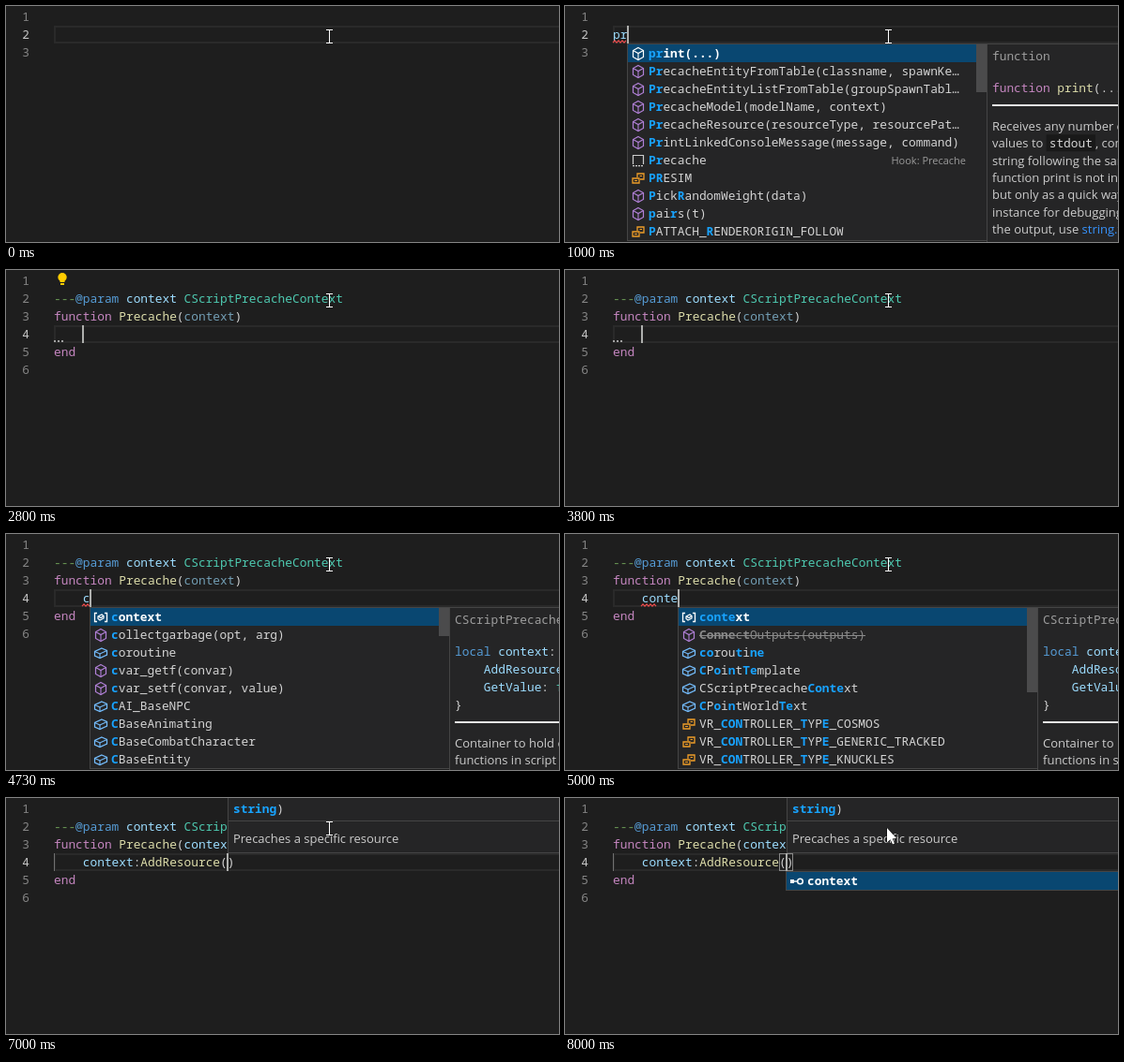
Animation, 589 px wide and 252 px high, one loop 8300 ms. Source, as an HTML page with a canvas:

```html
<!DOCTYPE html>
<html lang="en">
<head>
<meta charset="utf-8">
<title>Editor completion</title>
<style>
html, body { margin: 0; width: 100%; height: 100%; overflow: hidden; background: #1e1e1e; }
canvas { display: block; width: 589px; height: 252px; }
</style>
</head>
<body>
<canvas id="stage" width="589" height="252"></canvas>
<script>
const ctx = document.getElementById('stage').getContext('2d');
const LOOP = 8300, LEFT = 51, CHAR = 7.698, ROW = 19, MENU_W = 383;
const MONO = '12.83px "Noto Sans Mono", monospace';
const SANS = '13px "Open Sans", sans-serif';
const MATCH = '#18a3ff';

// Rich text: parts split by "|", each starting with its colour key.
const COLORS = {
  w: '#d4d4d4', g: '#9d9d9d', v: '#9cdcfe', u: '#729db3', k: '#c586c0', f: '#dcdcaa',
  b: '#569cd6', t: '#4ec9b0', c: '#6a9955', n: '#cccccc', l: '#3794ff', x: '#d4d4d4'
};

// Menu rows: icon kind, then the label with matched letters in brackets.
const FUNCS = [
  'm[#]ecacheEntityFromTable(classname, spawnKe…',
  'm[#]ecacheEntityListFromTable(groupSpawnTabl…',
  'm[#]ecacheModel(modelName, context)',
  'm[#]ecacheResource(resourceType, resourcePat…'
];
const funcs = typed => FUNCS.map(s => s.replace('[#]ecache', `[${typed}]${'Precache'.slice(typed.length)}`));
const CONTROLLERS = ['COSMOS', 'GENERIC_TRACKED', 'KNUCKLES'];
const controllers = head => CONTROLLERS.map(s => `e${head}_${s}`);

const MENUS = {
  p: { bar: 36, rows: ['m[p]rint(...)', 'm[p]airs(t)', 'm[p]call(f, arg1)', ...funcs('P'),
    'm[P]rintLinkedConsoleMessage(message, command)', 's[P]recache', 'm[P]ickRandomWeight(data)', 'e[P]RESIM'] },
  pr: { bar: 51, rows: ['m[pr]int(...)', ...funcs('Pr'), 'm[Pr]intLinkedConsoleMessage(message, command)',
    's[Pr]ecache', 'e[PR]ESIM', 'm[P]ick[R]andomWeight(data)', 'm[p]ai[r]s(t)', 'e[P]ATTACH_[R]ENDERORIGIN_FOLLOW'] },
  pre: { bar: 90, rows: [...funcs('Pre'), 's[Pre]cache', 'e[PRE]SIM', 'fCScript[Pre]cacheContext',
    'e[P]ATTACH_[RE]NDERORIGIN_FOLLOW', 'm[p]ai[r]s(t)', 'm[P]ick[R]andomW[e]ight(data)'] },
  prec: { pick: 4, rows: [...funcs('Prec'), 's[Prec]ache', 'fCScript[Prec]acheContext'] },
  c: { bar: 30, rows: ['v[c]ontext', 'm[c]ollectgarbage(opt, arg)', 'f[c]oroutine', 'm[c]var_getf(convar)',
    'm[c]var_setf(convar, value)', 'f[C]AI_BaseNPC', 'f[C]BaseAnimating', 'f[C]BaseCombatCharacter', 'f[C]BaseEntity'] },
  co: { bar: 44, rows: ['v[co]ntext', 'm[co]llectgarbage(opt, arg)', 'd[Co]nnectOutputs(outputs)', 'f[co]routine',
    'f[C]P[o]intTemplate', 'f[C]P[o]intWorldText', 'fCScriptPrecache[Co]ntext', ...controllers('VR_[CO]NTROLLER_TYPE').slice(0, 2)] },
  conte: { bar: 90, rows: ['v[conte]xt', 'd[Conne]c[t]Outputs(outputs)', 'f[co]rou[t]i[ne]', 'f[C]P[o]i[n]t[Te]mplate',
    'fCScriptPrecache[Conte]xt', 'f[C]P[o]i[n]tWorld[Te]xt', ...controllers('VR_[CON]TROLLER_[T]YP[E]')] },
  context: { rows: ['v[context]', 'fCScriptPrecache[Context]', 'f[C]P[o]i[n]tWorld[Text]'] },
  methods: { rows: ['mAddResource(resource)', 'mGetValue(key)'] },
  param: { rows: ['kcontext'] }
};

const DOCS = {
  print: { head: 'function', code: ['kfunction|f print|w(...)'], text: [
    'nReceives any number of arguments', 'nvalues to |xstdout|n, converting', 'nstring following the same rules',
    'nfunction print is not intended', 'nbut only as a quick way to', 'ninstance for debugging. For', 'nthe output, use |lstring.format'] },
  snippet: { head: 'Hook: Precache', code: ['c---|b@param|v context|t CScriptPrecacheContext',
    'kfunction|f Precache|w(|vcontext|w)', '', 'kend'], text: [] },
  context: { head: 'CScriptPrecacheContext', code: ['blocal|v context|w: |tCScriptPrecacheContext|w {',
    'v    AddResource|w: |tfunction', 'v    GetValue|w: |tfunction', 'w}'],
    text: ['nContainer to hold context', 'nfunctions in script'] },
  method: { head: 'function', code: ['tmethod CScriptPrecacheContext'], text: ['nPrecaches a specific resource'], h: 104 }
};

// time, typed text, menu, doc panel, squiggle columns
const STEPS = [
  [0, ''],
  [730, 'vp'],
  [800, 'vp', 'p', null, [0, 1]],
  [870, 'vp', 'p', 'print', [0, 1]],
  [930, 'vpr', 'p', 'print', [0, 1]],
  [1000, 'vpr', 'pr', 'print', [0, 2]],
  [1130, 'vpre', 'pr', 'print', [0, 2]],
  [1200, 'vpre', 'pre', 'print', [0, 3]],
  [1400, 'vprec', 'prec', 'snippet', [0, 4]],
  [2800, ''],
  [4670, 'vc'],
  [4730, 'vc', 'c', 'context', [4, 5]],
  [4800, 'vco', 'co', 'context', [4, 5]],
  [4870, 'vcon', 'co', 'context', [4, 6]],
  [4930, 'vcont', 'conte', 'context', [4, 6]],
  [5000, 'vconte', 'conte', 'context', [4, 6]],
  [5070, 'vcontex', 'context', 'context', [4, 9]],
  [5270, 'vcontext', 'context', 'context', [4, 11]],
  [5600, 'vcontext|w:', null, null, [4, 11]],
  [5670, 'vcontext|w:', 'methods', null, [11.5, 12.5]],
  [5730, 'vcontext|w:', 'methods', 'method', [11.5, 12.5]],
  [6470, 'vcontext|w:|fAddResource', null, null, [11.5, 12.5]],
  [6530, 'vcontext|w:|fAddResource', null, null, [22.5, 23.5]],
  [6930, 'vcontext|w:|fAddResource|w()'],
  [7130, 'vcontext|w:|fAddResource|w()', 'param']
];
const BLINKS = [470, 1870, 2330, 3270, 3800, 4270, 4670, 6070, 6470, 7530, 8000];

const colX = col => Math.floor(LEFT + col * CHAR);
const plain = rich => rich.split('|').map(s => s.slice(1)).join('');

function rect(x, y, w, h, color) {
  ctx.fillStyle = color;
  ctx.fillRect(x, y, w, h);
}

function box(x, y, w, h) {
  rect(x, y, w, h, '#454545');
  rect(x + 1, y + 1, w - 2, h - 2, '#252526');
}

function text(s, x, y, color, font = MONO) {
  ctx.font = font;
  ctx.fillStyle = color;
  ctx.fillText(s, x, y);
  return x + ctx.measureText(s).width;
}

function rich(s, x, y) {
  for (const part of s.split('|')) {
    const key = part[0], body = part.slice(1);
    if (key === 'x') {
      rect(x, y - 14, body.length * CHAR + 6, 18, '#191919');
      x = text(body, x + 3, y, COLORS.x) + 3;
    } else if (key) {
      x = text(body, x, y, COLORS[key], 'nl'.includes(key) ? SANS : MONO);
    }
  }
}

function path(points, color, width = 1.1, close = false) {
  ctx.beginPath();
  points.forEach(([x, y]) => ctx.lineTo(x, y));
  if (close) ctx.closePath();
  ctx.strokeStyle = color;
  ctx.lineWidth = width;
  ctx.stroke();
}

function icon(kind, x, y, selected) {
  const hue = { m: '#b180d7', d: '#b180d7', f: '#75beff', v: '#75beff', e: '#ee9d28', s: '#cccccc', k: '#cccccc' };
  const color = selected ? '#ffffff' : hue[kind];
  ctx.save();
  ctx.translate(x, y);
  if (kind === 'm' || kind === 'd') {
    path([[0, -6.5], [5.5, -3.5], [5.5, 3.5], [0, 6.5], [-5.5, 3.5], [-5.5, -3.5]], color, 1.2, true);
    path([[-5.5, -3.5], [0, -.5], [5.5, -3.5]], color);
    path([[0, -.5], [0, 6.5]], color);
  } else if (kind === 'f') {
    path([[1, -5], [6.5, -2.5], [6.5, 2], [-1, 5.5], [-6.5, 3], [-6.5, -1.5]], color, 1.2, true);
    path([[-6.5, -1.5], [-1, 1], [6.5, -2.5]], color);
    path([[-1, 1], [-1, 5.5]], color);
  } else if (kind === 'v') {
    for (const s of [-1, 1]) path([[s * 4, -4.5], [s * 6.5, -4.5], [s * 6.5, 4.5], [s * 4, 4.5]], color, 1.3);
    path([[-3, -1], [1, -3], [3, -1.5], [3, 1], [-1, 3], [-3, 1.5]], color, 1.2, true);
    path([[-3, -1], [0, .5], [3, -1.5]], color);
  } else if (kind === 'e') {
    path([[-1, -1], [-1, -5], [6, -5], [6, 1], [2, 1]], color, 1.3);
    path([[-6, 0], [1, 0], [1, 5], [-6, 5]], color, 1.3, true);
    path([[1.5, -2.5], [4, -2.5]], color);
    path([[-4, 2.5], [-1, 2.5]], color);
  } else if (kind === 's') {
    path([[-5.5, 4], [-5.5, -5.5], [5.5, -5.5], [5.5, 4]], color, 1.2);
    for (let i = -6; i < 6; i += 3) rect(i, 5, 2, 1.3, color);
  } else {
    ctx.beginPath();
    ctx.arc(3.5, 0, 2.8, 0, 7);
    ctx.strokeStyle = color;
    ctx.lineWidth = 1.5;
    ctx.stroke();
    path([[-5, 0], [1, 0]], color, 1.4);
    rect(-7, -2, 4, 4, color);
  }
  ctx.restore();
}

function drawMenu({ rows, bar, pick = 0 }, x, top) {
  box(x, top, MENU_W + 1, rows.length * ROW + 2);
  rows.forEach((row, i) => {
    const y = top + 1 + i * ROW, selected = i === pick, kind = row[0];
    if (selected) rect(x + 1, y, MENU_W - 1, ROW, '#094771');
    icon(kind, x + 12, y + 10, selected);
    let end = x + 23;
    row.slice(1).split(/[\[\]]/).forEach((part, j) => {
      const hit = j % 2;
      const color = kind === 'd' ? '#8a8a8a' : hit ? MATCH : selected ? '#ffffff' : '#d4d4d4';
      end = text(part, end, y + 14, color, (hit || selected ? 'bold ' : '') + MONO);
    });
    if (kind === 'd') rect(x + 23, y + 10, end - x - 23, 1, '#8a8a8a');
    if (kind === 's') {
      ctx.textAlign = 'right';
      text('Hook: Precache', x + 361, y + 14, '#9a9a9a', '11px "Open Sans", sans-serif');
      ctx.textAlign = 'left';
    }
  });
  if (bar) rect(x + MENU_W - 11, top + 1, 11, bar, '#4b4b4c');
}

function drawDoc({ head, code, text: lines, h = 260 }, x, top) {
  box(x, top, 400, h);
  text(head, x + 6, top + 18, COLORS.g);
  code.forEach((s, i) => rich(s, x + 6, top + 52 + i * ROW));
  const rule = top + 46 + code.length * ROW;
  rect(x + 6, rule, 380, 2, '#e4e4e4');
  lines.forEach((s, i) => rich(s, x + 6, rule + 28 + i * 18.3));
  if (h < 200) rect(x + 1, top + h - 11, 200, 10, '#434346');
}

function drawSignature() {
  box(236, -4, 400, 63);
  const end = text('string', 242, 16, MATCH, 'bold ' + MONO);
  text(')', end, 16, COLORS.w);
  rect(237, 24, 352, 1, '#454545');
  text('Precaches a specific resource', 242, 48, COLORS.n, SANS);
}

function drawSquiggle([from, to], bottom) {
  const points = [];
  for (let x = colX(from), i = 0; x <= colX(to); x += 2, i++) points.push([x, bottom - (i % 2 ? 3.2 : .8)]);
  path(points, '#f14c4c', 1.1);
}

function drawBulb() {
  ctx.fillStyle = '#ffcc00';
  ctx.beginPath();
  ctx.arc(60, 7.8, 4.7, 0, 7);
  ctx.fill();
  rect(57.5, 10, 5, 3, '#ffcc00');
  rect(58, 14, 4, 2, '#ffcc00');
}

function drawMouse(arrow) {
  if (!arrow) {
    rect(341, 25, 7, 1, '#ffffff');
    rect(341, 39, 7, 1, '#ffffff');
    rect(344, 25, 1, 14, '#ffffff');
    return;
  }
  ctx.beginPath();
  [[343, 32], [343, 47.5], [346.5, 44.3], [349, 49.5], [351, 48.5], [348.7, 43.5], [353, 43]].forEach(p => ctx.lineTo(...p));
  ctx.closePath();
  ctx.strokeStyle = '#000000';
  ctx.lineWidth = 1;
  ctx.stroke();
  ctx.fillStyle = '#ffffff';
  ctx.fill();
}

function draw(t) {
  const [, typed, menu, doc, squiggle] = STEPS.filter(s => s[0] <= t).pop();
  const expanded = t >= 2800, called = t >= 6930;
  const line = expanded ? 4 : 2, top = 2 + (line - 1) * ROW, bottom = top + ROW;
  const indent = expanded ? 4 : 0;
  const caret = indent + plain(typed).length - (called ? 1 : 0);

  rect(0, 0, 589, 252, '#1e1e1e');
  ctx.strokeStyle = '#2a2a2a';
  ctx.lineWidth = 2;
  ctx.strokeRect(LEFT + 1, top + 1, 560, ROW - 2);
  if (t >= 5270) rect(LEFT, top, 1, ROW, '#707070');

  ctx.textAlign = 'right';
  for (let n = 1; n <= (expanded ? 6 : 3); n++) {
    text(n, 25, n * ROW - 3, n === line ? '#c6c6c6' : '#858585');
  }
  ctx.textAlign = 'left';

  if (expanded) {
    const param = t < 5270 ? 'u' : 'v';
    rich('c---|b@param|v context|t CScriptPrecacheContext', LEFT, 35);
    rich(`kfunction|f Precache|w(|${param}context|w)`, LEFT, 54);
    rich('kend', LEFT, 92);
    if (t < 4670) for (let i = 0; i < 3; i++) rect(LEFT + i * 4, 75, 2, 2, '#a0a0a0');
  }
  if (t >= 7070) {
    ctx.strokeStyle = '#888888';
    ctx.lineWidth = 1;
    for (const col of [23, 24]) ctx.strokeRect(colX(col) + .5, top + .5, 7, ROW - 1);
  }
  rich(typed, LEFT + indent * CHAR, bottom - 5);
  if (squiggle) drawSquiggle(squiggle, bottom);
  if (t >= 1670 && t < 3070) drawBulb();
  if (BLINKS.filter(b => b <= t).length % 2) rect(colX(caret), top, 2, ROW, '#aeafad');

  if (menu) drawMenu(MENUS[menu], colX(caret), bottom);
  if (doc) drawDoc(DOCS[doc], colX(caret) + MENU_W, bottom);
  if (t >= 7000) drawSignature();
  drawMouse(t >= 7070);
}

const start = performance.now();
function frame() {
  draw((performance.now() - start) % LOOP);
  requestAnimationFrame(frame);
}
frame();
</script>
</body>
</html>
```
